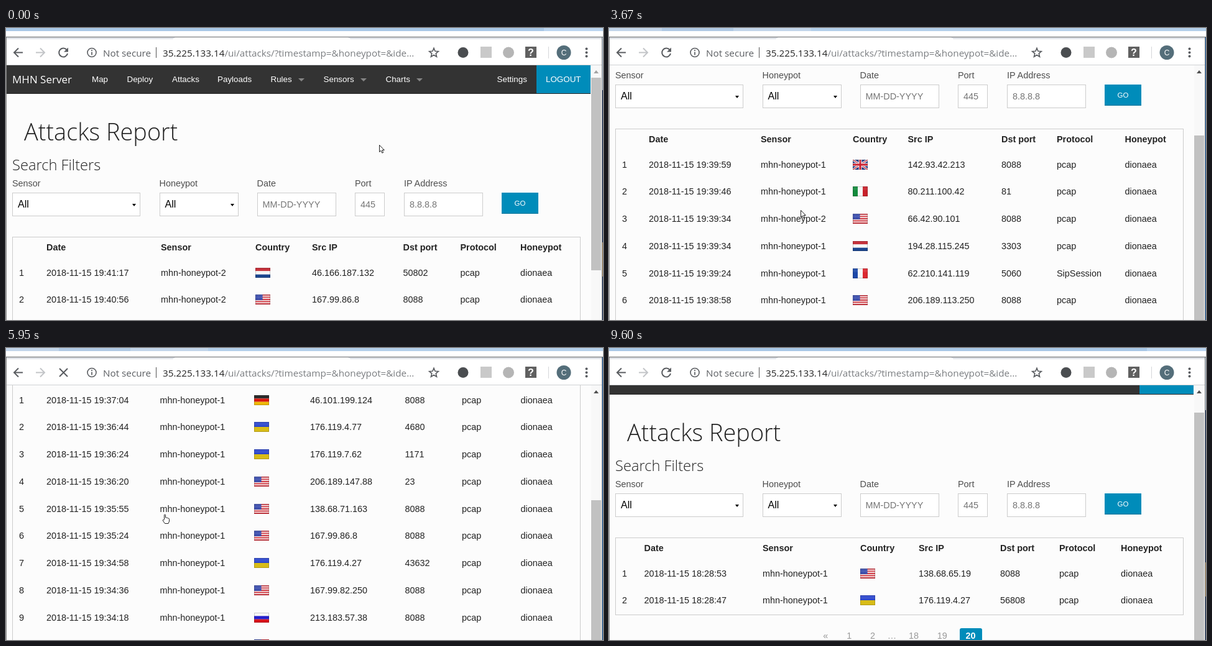
These frames come from a looping animation (960x470 px, 9.7 s). An HTML page:

```html
<!DOCTYPE html>
<html lang="en">
<head>
<meta charset="utf-8">
<title>Attacks Report</title>
<style>
html, body { margin: 0; width: 100%; height: 100%; overflow: hidden; background: #fcfcfc; }
#stage { position: relative; width: 960px; height: 470px; overflow: hidden; background: #fcfcfc;
  font: 14.4px "Liberation Sans", Arial, sans-serif; color: #222; }
#stage div, #stage svg, .t { position: absolute; }
.t { line-height: 20px; margin-top: -10px; white-space: pre; }
#view { left: 0; top: 60px; width: 940px; height: 410px; overflow: hidden; }
#doc { left: 0; top: -60px; width: 940px; height: 1100px; }
.nav { left: 0; top: 60px; width: 940px; height: 46px; background: #333; border-bottom: 1px solid #222; box-sizing: border-box; }
.logout { left: 853px; top: 60px; width: 87px; height: 45px; background: #008cba; }
.item { font-size: 13.4px; color: #fff; }
.brand { font: 17px/20px "Open Sans", sans-serif; color: #fff; }
.down { border: 5px solid transparent; border-top-color: #858585; border-bottom: 0; }
.h1 { font: 300 37.9px/20px "Open Sans", sans-serif; }
.h2 { font: 300 23.7px/20px "Open Sans", sans-serif; }
.label { color: #4d4d4d; }
.field { top: 265px; height: 38px; border: 1px solid #ccc; background: #fff; box-sizing: border-box; }
.all { font-size: 16px; color: #000; }
.hint { color: #757575; }
.caret { border: 3px solid transparent; border-top: 4px solid #000; border-bottom: 0; }
.go { left: 797px; top: 265px; width: 59px; height: 34px; background: #008cba; border-bottom: 1px solid #007095; box-sizing: border-box; }
.gotext { font-size: 11.5px; color: #fff; }
.table { left: 10px; top: 336px; width: 914px; border: 1px solid #ccc; box-sizing: border-box; }
.b { font-weight: bold; }
.pager { left: 10px; width: 914px; height: 24px; display: flex; justify-content: center; gap: 9.8px; line-height: 24px; color: #999; }
.pager span { padding: 0 10px; border-radius: 3px; }
.pager .dots { padding: 0; }
.pager .hover { background: #e3e3e3; }
.pager .now { background: #008cba; color: #fff; font-weight: bold; }
#bar { left: 941px; top: 60px; width: 16px; height: 410px; background: #f8f8f8; }
#thumb { left: 0; width: 16px; background: #c1c1c1; }
#up { left: 4px; top: 8px; border: 4px solid transparent; border-bottom: 5px solid #505050; border-top: 0; }
#chrome { left: 0; top: 0; width: 960px; height: 60px; background: #fff; }
.strip { left: 0; top: 0; width: 960px; height: 5px; }
.url { font: 15.25px/20px "Open Sans", sans-serif; color: #7a7d80; }
.url b { font-weight: normal; color: #222; }
.edge { top: 15px; width: 1px; height: 455px; }
</style>
</head>
<body>
<div id="stage">
  <div id="view"><div id="doc"></div></div>
  <div id="bar"><div id="thumb"></div><div id="up"></div></div>
  <div id="chrome">
    <div class="strip" id="strip"></div>
    <svg width="960" height="60" fill="none" stroke="#5a5d61" stroke-width="2">
      <path d="M0 14.5H960" stroke="#66696c" stroke-width="1"/>
      <path d="M0 15H272L268 18H0ZM550 15H960V18H554Z" fill="#dee1e6" stroke="none"/>
      <path d="M0 59.5H960" stroke="#d0d2d4" stroke-width="1"/>
      <path d="M27 39.5H13M20 32.5L13 39.5L20 46.5"/>
      <path d="M48 39.5H62M55 32.5L62 39.5L55 46.5" stroke="#c3c5c8"/>
      <g id="reload"><path d="M97.5 35A7 7 0 1 0 99 41"/><path d="M100 31.5V38.5H93Z" fill="#5a5d61" stroke="none"/></g>
      <path id="stop" d="M86 33L99 46M99 33L86 46"/>
      <circle cx="138" cy="39.5" r="7" stroke-width="1.6"/>
      <path d="M138 38.5V43.5M138 35V37" stroke-width="1.7"/>
      <path d="M241.5 31V48" stroke="#555" stroke-width="1"/>
      <path d="M688 32.5L690 37.3L695.2 37.7L691.3 41.1L692.5 46.2L688 43.5L683.5 46.2L684.7 41.1L680.8 37.7L686 37.3Z" stroke-width="1.7"/>
      <g stroke="none">
        <circle cx="735" cy="39.5" r="8.5" fill="#4a4d50"/>
        <rect x="763" y="30" width="18" height="18" fill="#c9c9c9"/>
        <circle cx="808" cy="39.5" r="9" fill="#b5b5b5"/>
        <rect x="835" y="30" width="18" height="18" fill="#606060"/>
        <circle cx="897" cy="39.5" r="11.5" fill="#546e7a"/>
        <g fill="#5a5d61"><circle cx="933.5" cy="33.5" r="2"/><circle cx="933.5" cy="39.5" r="2"/><circle cx="933.5" cy="45.5" r="2"/></g>
      </g>
      <path d="M872.5 30V49" stroke="#d5d7da" stroke-width="1"/>
      <g stroke="none" fill="#fff" text-anchor="middle" font-family="Liberation Sans, Arial, sans-serif">
        <text x="844" y="45" font-size="16" font-weight="bold">?</text><text x="897" y="44" font-size="12">C</text>
      </g>
    </svg>
    <span class="t url" style="left:156px;top:39.5px;color:#5a5d61">Not secure</span>
    <span class="t url" style="left:252px;top:39.5px"><b>35.225.133.14</b>/ui/attacks/?timestamp=&amp;honeypot=&amp;ide...</span>
  </div>
  <div class="edge" style="left:0;background:#8a8a8a"></div>
  <div class="edge" style="left:958px;background:#777"></div>
  <div class="edge" id="edge" style="left:959px"></div>
  <svg id="arrow" width="14" height="18"><path d="M.5 .5V11.5L3 9.2L4.8 13.2L6.7 12.4L5 8.5H8.3Z" fill="#fff" stroke="#222"/></svg>
  <svg id="hand" width="16" height="18"><path d="M3.5 9V1.5Q4.5 .3 5.5 1.5V6Q7 5.2 7.7 6.5Q9.2 5.8 9.7 7.2Q11.5 6.8 11.5 8.5V12L10 15.5H4.5L1 10.5Q1 8.5 3.5 10" fill="#fff" stroke="#222"/></svg>
</div>
<script>
const $ = id => document.getElementById(id);
const doc = $("doc");

function add(parent, cls, style = {}, text = "", tag = "div") {
  const el = document.createElement(tag);
  el.className = cls;
  el.textContent = text;
  for (const k in style) el.style[k] = typeof style[k] === "number" ? style[k] + "px" : style[k];
  return parent.appendChild(el);
}
const put = (parent, text, left, top, cls = "") => add(parent, "t " + cls, { left, top }, text, "span");

// Flags, 24 x 16
const rect = (x, y, w, h, c) => `<rect x="${x}" y="${y}" width="${w}" height="${h}" fill="${c}"/>`;
const line = (d, c, w) => `<path d="${d}" stroke="${c}" stroke-width="${w}"/>`;
const shape = (d, c) => `<path d="${d}" fill="${c}"/>`;
const dot = (x, y, r, c) => `<circle cx="${x}" cy="${y}" r="${r}" fill="${c}"/>`;
const rows = (...c) => c.map((v, i) => rect(0, i * 16 / c.length, 24, 16 / c.length, v)).join("");
const cols = (...c) => c.map((v, i) => rect(i * 24 / c.length, 0, 24 / c.length, 16, v)).join("");
const stripes = Array.from({ length: 9 }, (_, i) => i % 2 ? "#f0d8d8" : "#cc2430");
const stars = Array.from({ length: 12 }, (_, i) => dot(1.8 + i % 4 * 2.6, 1.6 + (i >> 2) * 2.7, .45, "#c5cdf0")).join("");
const saltire = "M0 0L24 16M24 0L0 16", cross = "M12 0V16M0 8H24";
const flags = {
  us: rows(...stripes) + rect(0, 0, 11.5, 8.9, "#3044a8") + stars,
  nl: rows("#c0242e", "#f6f6f6", "#1c468f"),
  de: rows("#1c1c1c", "#d8180f", "#eeb808"),
  ua: rows("#2a45cc", "#d8bc18"),
  ru: rows("#f6f6f6", "#2420cc", "#d8141c"),
  it: cols("#128a3c", "#f6f6f6", "#c8202a"),
  fr: cols("#1c48a8", "#f6f6f6", "#dc2830"),
  cn: rect(0, 0, 24, 16, "#d2180e") + dot(5, 5, 2, "#f0b820") + dot(9, 3, .7, "#f0b820") + dot(10, 6, .7, "#f0b820"),
  kr: rect(0, 0, 24, 16, "#f4f4f4") + shape("M8 8A4 4 0 0 1 16 8Z", "#d0303c") + shape("M8 8A4 4 0 0 0 16 8Z", "#24489a") +
    line("M4 5L6 3M18 3L20 5M4 11L6 13M18 13L20 11", "#333", 2),
  sc: rect(0, 0, 24, 16, "#1c3c90") + shape("M0 16L8 0H16Z", "#f0d040") + shape("M0 16L16 0H24V5Z", "#d0281f") +
    shape("M0 16L24 5V11Z", "#f4f4f4") + shape("M0 16L24 11V16Z", "#1c8035") ,
  gb: rect(0, 0, 24, 16, "#1c3585") + line(saltire, "#f4f4f4", 3.2) + line(saltire, "#cc2a3a", 1.2) +
    line(cross, "#f4f4f4", 5) + line(cross, "#cc2030", 3)
};
const gloss = `<rect width="24" height="6" fill="#fff" opacity=".07"/><rect x=".5" y=".5" width="23" height="15" fill="none" stroke="#000" stroke-opacity=".18"/>`;

// Shared top of the page
add(doc, "nav");
add(doc, "logout");
put(doc, "MHN Server", 10, 83, "brand");
[["Map", 138], ["Deploy", 194.5], ["Attacks", 267], ["Payloads", 340], ["Rules", 425.5], ["Sensors", 510.5],
  ["Charts", 610.5], ["Settings", 789.5], ["LOGOUT", 868]].forEach(([s, x]) => put(doc, s, x, 83, "item"));
[470, 570, 660].forEach(left => add(doc, "down", { left, top: 81 }));
put(doc, "Attacks Report", 29, 166, "h1");
put(doc, "Search Filters", 10, 220, "h2");
[["Sensor", 10, 206, "All"], ["Honeypot", 246.5, 127, "All"], ["Date", 403.5, 127, "MM-DD-YYYY"],
  ["Port", 561, 48, "445"], ["IP Address", 640, 127, "8.8.8.8"]].forEach(([name, left, width, value]) => {
  const list = value === "All";
  put(doc, name, left, 250, "label");
  add(doc, "field", { left, width });
  put(doc, value, left + 9, 284, list ? "all" : "hint");
  if (list) add(doc, "caret", { left: left + width - 13, top: 283 });
});
add(doc, "go");
put(doc, "GO", 817.5, 282, "gotext");

// Each row: time, sensor, country, source, port, protocol
const heads = ["Date", "Sensor", "Country", "Src IP", "Dst port", "Protocol", "Honeypot"];
const pages = {
  1: { x: [65, 249, 401, 492, 638.5, 730.5, 827], links: "1 2 3 4 5 … 19 20 »", rows: `19:41:17 2 nl 46.166.187.132 50802
19:40:56 2 us 167.99.86.8 8088
19:40:47 1 kr 14.49.194.245 3483
19:40:18 2 de 46.101.208.222 8088
19:40:18 2 us 104.248.6.137 8088
19:40:15 1 cn 111.62.24.216 6382
19:40:03 2 sc 185.10.68.153 81
19:39:59 1 gb 142.93.42.213 8088
19:39:46 1 it 80.211.100.42 81
19:39:34 2 us 66.42.90.101 8088` },
  2: { x: [64, 244, 392, 480.5, 631, 720, 829.5], links: "« 1 2 3 4 5 6 … 19 20 »", rows: `19:39:59 1 gb 142.93.42.213 8088
19:39:46 1 it 80.211.100.42 81
19:39:34 2 us 66.42.90.101 8088
19:39:34 1 nl 194.28.115.245 3303
19:39:24 1 fr 62.210.141.119 5060 SipSession
19:38:58 1 us 206.189.113.250 8088
19:38:41 1 us 167.99.86.8 8088
19:38:20 1 ua 176.119.4.27 4680
19:37:52 2 us 138.68.71.163 8088
19:37:31 1 us 167.99.82.250 8088` },
  3: { x: [65, 247.5, 398.5, 489, 641.5, 733, 827.5], links: "« 1 2 3 4 5 6 7 … 19 20 »", rows: `19:37:04 1 de 46.101.199.124 8088
19:36:44 1 ua 176.119.4.77 4680
19:36:24 1 ua 176.119.7.62 1171
19:36:20 1 us 206.189.147.88 23
19:35:55 1 us 138.68.71.163 8088
19:35:24 1 us 167.99.86.8 8088
19:34:58 1 ua 176.119.4.27 43632
19:34:36 1 us 167.99.82.250 8088
19:34:18 1 ru 213.183.57.38 8088
19:33:00 1 us 206.189.113.250 8088` },
  20: { x: [56.5, 247, 404, 498, 629, 724, 823], links: "« 1 2 … 18 19 20", rows: `18:28:53 1 us 138.68.65.19 8088
18:28:47 1 ua 176.119.4.27 56808` }
};
for (const n in pages) {
  const page = pages[n], x = page.x, lines = page.rows.split("\n");
  const box = page.el = add(doc, "", { left: 0, top: 0 });
  const end = Math.round(372.5 + 43.77 * lines.length);
  add(box, "table", { height: end - 335 });
  heads.forEach((h, i) => put(box, h, x[i], 352.5, "b"));
  lines.forEach((text, i) => {
    const [time, sensor, flag, ip, port, proto = "pcap"] = text.split(" ");
    const y = 393.5 + 43.77 * i;
    put(box, i + 1, 21, y);
    ["2018-11-15 " + time, "mhn-honeypot-" + sensor, "", ip, port, proto, "dionaea"]
      .forEach((s, k) => s && put(box, s, x[k], y));
    add(box, "", { left: Math.round(x[2]), top: Math.round(y - 8) }).innerHTML =
      `<svg width="24" height="16" fill="none">${flags[flag]}${gloss}</svg>`;
  });
  const pager = add(box, "pager", { top: end + 22 });
  page.buttons = page.links.split(" ").map(s => add(pager, s === n ? "now" : s === "…" ? "dots" : "", {}, s, "span"));
}

// Timeline of hard steps; each one changes only the named values
const at = (x, y, hand = false) => ({ x, y, hand });
const steps = [
  [0, { page: 1, scroll: 0, busy: false, hover: "", fresh: true, ...at(600, 188) }],
  [360, at(500, 146)], [480, at(380, 110)], [610, at(262, 88)], [730, at(189, 133)],
  [1070, { scroll: 40 }], [1200, { scroll: 160 }], [1440, { scroll: 296 }], [1570, { scroll: 427 }],
  [2030, at(262, 290)], [2150, { hover: "2", ...at(350, 411, true) }], [2270, at(332, 350, true)],
  [2380, { busy: true, ...at(304, 293, true) }], [2500, at(308, 293)],
  [2730, { fresh: false }], [2850, { page: 2, scroll: 0, hover: "" }],
  [3190, { scroll: 10 }], [3310, { busy: false }], [3430, { scroll: 38 }],
  [3670, { scroll: 174 }], [3800, { scroll: 427 }],
  [4160, at(350, 360)], [4290, { hover: "3", ...at(394, 412, true) }], [4410, at(251, 267, true)],
  [4740, { busy: true }], [4960, { page: 3, scroll: 0, hover: "" }],
  [5460, { scroll: 36 }], [5580, { scroll: 78 }], [5700, { scroll: 150 }], [5820, { scroll: 232 }],
  [5940, { scroll: 310 }], [6050, { scroll: 375 }], [6170, { scroll: 419 }],
  [6290, { busy: false, ...at(320, 269) }], [6410, at(380, 270)],
  [6540, at(510, 345)], [6650, { hover: "20", ...at(630, 420, true) }], [6770, at(425, 269, true)],
  [7110, { busy: true }], [7230, at(431, 269)],
  [7820, { page: 20, scroll: 0, hover: "" }], [7940, at(424, 268, true)], [8060, { busy: false }],
  [8430, { scroll: 22 }], [8550, { scroll: 31, ...at(590, 340) }], [8670, at(760, 410)], [8780, at(925, 480)],
  [9010, at(927, 468)], [9120, at(931, 467)], [9230, at(936, 467)], [9340, at(950, 480)],
  [9600, { fresh: true }]
];
const show = (el, on) => el.style.display = on ? "" : "none";

function draw(t) {
  const s = Object.assign({}, ...steps.filter(k => k[0] <= t).map(k => k[1]));
  for (const n in pages) show(pages[n].el, +n === s.page);
  pages[s.page].buttons.forEach(b => b.classList.toggle("hover", b.textContent === s.hover));
  doc.style.transform = `translateY(${-s.scroll}px)`;
  const short = s.page === 20;
  $("thumb").style.top = Math.round(19.5 + s.scroll * (short ? .8 : .535)) + "px";
  $("thumb").style.height = (short ? 462 : 310) + "px";
  $("up").style.borderBottomColor = s.scroll ? "#505050" : "#a3a3a3";
  show($("reload"), !s.busy);
  show($("stop"), s.busy);
  for (const id of ["arrow", "hand"]) {
    show($(id), (id === "hand") === s.hand);
    $(id).style.transform = `translate(${s.x}px, ${s.y}px)`;
  }
  $("strip").style.background = s.fresh
    ? "linear-gradient(90deg, #a9c8e6 865px, #bcd6f0 865px)"
    : "linear-gradient(90deg, #c3d6ea 85px, #b1cae4 85px 200px, #c3d6ea 200px 325px, #b4d0ea 325px)";
  $("edge").style.background = s.fresh
    ? "linear-gradient(#c5d5e6 85px, #1c3560 85px 330px, #b89a70 330px 385px, #1c3560 385px)" : "#2a6db5";
}

const start = performance.now();
function tick() {
  draw((performance.now() - start) % 9700);
  requestAnimationFrame(tick);
}
tick();
</script>
</body>
</html>
```
